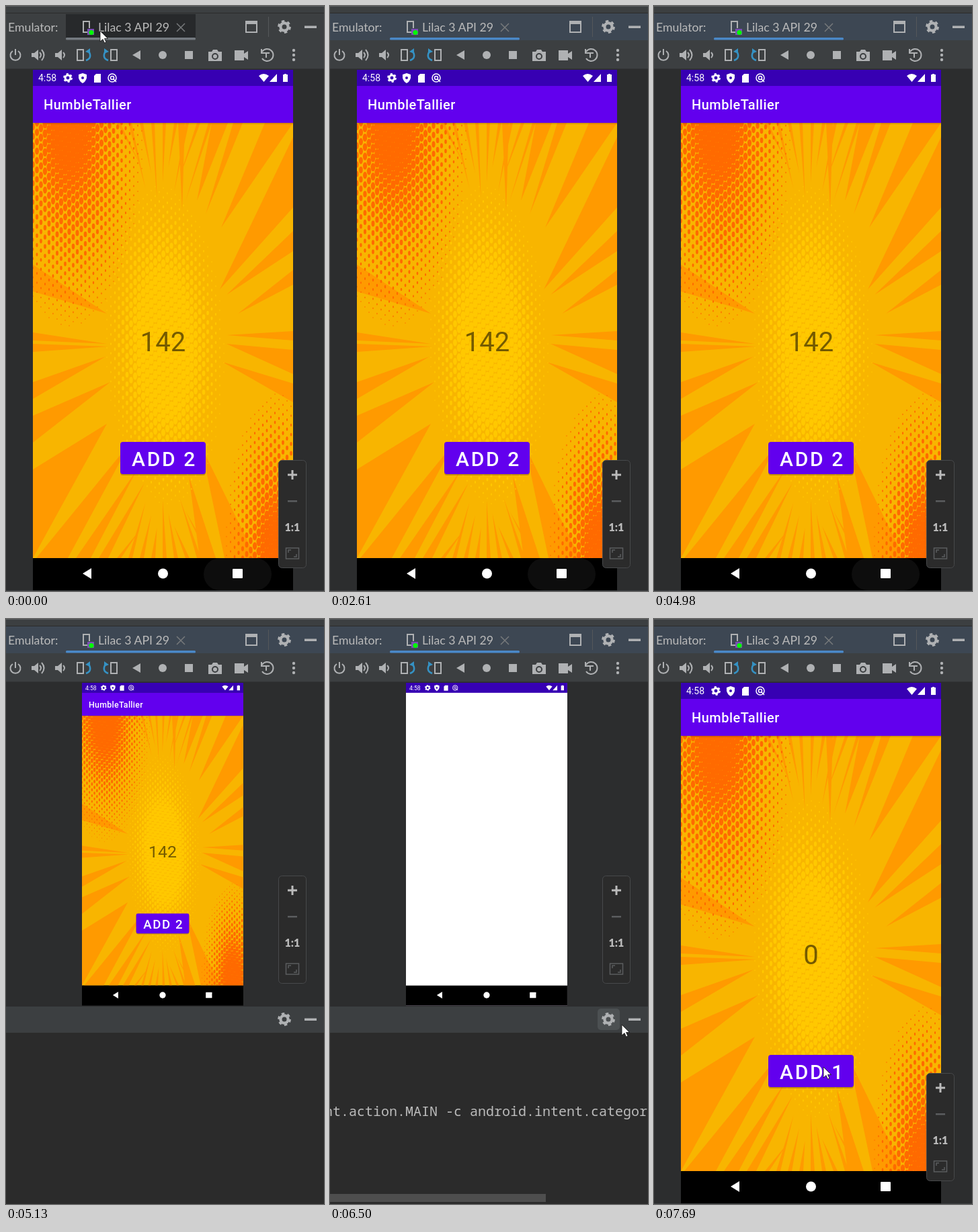
An HTML page that plays this animation: 473 by 871 pixels, repeating every 8000 ms.

```html
<!DOCTYPE html>
<html lang="en">
<head>
<meta charset="utf-8">
<style>
html, body { margin: 0; width: 100%; height: 100%; overflow: hidden; background: #2c2d2e; }
svg { display: block; }
text { white-space: pre; }
.ui { font: 17.7px Lato, sans-serif; fill: #bbb; }
.app { font-family: Roboto, sans-serif; fill: #fff; }
.line { fill: none; stroke: #afb1b3; stroke-width: 2; }
.icon { fill: #afb1b3; }
</style>
</head>
<body>
<svg id="stage" width="473" height="871" viewBox="0 0 473 871"></svg>
<script>
const rect = (x, y, w, h, fill, more = '') => `<rect x="${x}" y="${y}" width="${w}" height="${h}" fill="${fill}" ${more}/>`;
const disc = (x, y, r, fill) => `<circle cx="${x}" cy="${y}" r="${r}" fill="${fill}"/>`;
const path = (d, more = 'class="icon"') => `<path d="${d}" ${more}/>`;
const line = d => path(d, 'class="line"');
const group = (id, body, more = '') => `<g id="${id}" ${more}>${body}</g>`;

function gear(x, y, r, color = '#afb1b3') {
  const tooth = 2 * Math.PI * r * .82 / 12;
  return `<g fill="none" stroke="${color}"><circle cx="${x}" cy="${y}" r="${r * .56}" stroke-width="${r * .42}"/>
    <circle cx="${x}" cy="${y}" r="${r * .82}" stroke-width="${r * .34}" stroke-dasharray="${tooth}"/></g>`;
}

// Comic backdrop: rays and halftone dots
function rays() {
  const left = [[150, 458, 385, 425], [150, 503, 486, 498], [152, 507, 503, 515], [148, 522, 560, 585], [155, 560, 610, 650], [150, 622, 690, 822]];
  const right = [[318, 422, 195, 300], [328, 430, 335, 365], [345, 458, 393, 415], [328, 490, 484, 498], [328, 503, 512, 548], [322, 530, 562, 590]];
  const top = [[262, 305, 256, 266], [284, 290, 306, 330], [297, 310, 338, 352], [320, 330, 385, 427]];
  const bottom = [[185, 650, 45, 92], [195, 690, 104, 126], [206, 710, 138, 152], [272, 700, 288, 312], [290, 655, 325, 372]];
  let d = '';
  const across = edge => ([x, y, a, b]) => d += `M${x} ${y}L${edge} ${a}V${b}z`;
  const along = edge => ([x, y, a, b]) => d += `M${x} ${y}L${a} ${edge}H${b}z`;
  left.forEach(across(40));
  right.forEach(across(427));
  top.forEach(along(174));
  bottom.forEach(along(822));
  for (let i = 0; i < 9; i++) {
    const x = 165 + i * 17;
    along(174)([(x + 233) / 2, 235 + i * 37 % 60, x, x + 5]);
    along(822)([(x + 233) / 2, 780 - i * 41 % 60, x, x + 6]);
  }
  return path(d, 'fill="#ff9a00"');
}

function dots(x0, x1, y0, y1, fill, size) {
  let d = '';
  for (let i = 0, x = x0; x < x1; i++, x += 6)
    for (let y = y0 + i * 8 % 14; y < y1; y += 14) {
      const r = size(x, y), w = r * .55;
      if (r > .9) d += `M${(x - w).toFixed(1)} ${y}a${w} ${r} 0 1 0 ${2 * w} 0a${w} ${r} 0 1 0 ${-2 * w} 0`;
    }
  return path(d, `fill="${fill}"`);
}

const fade = (x, y, cx, cy, rx, ry) => Math.max(0, 1 - Math.hypot((x - cx) / rx, (y - cy) / ry));
const backdrop = rect(40, 174, 387, 648, '#f8b500') + rays()
  + dots(138, 330, 255, 770, '#ffc800', (x, y) => 6.6 * Math.min(1, 1.7 * fade(x, y, 236 + (y - 500) * .03, 505, 96, 260)))
  + dots(40, 220, 166, 510, '#ff6a00', (x, y) => 7.4 * Math.min(1, 1.25 * fade(x, y, 95, 174, 122, 335)))
  + dots(316, 432, 550, 830, '#ff6a00', (x, y) => 7.4 * Math.min(1, 1.25 * fade(x, y, 402, 815, 84, 265)))
  + rect(40, 174, 387, 2, '#0002');

const appScreen = `<g transform="translate(-40 -95)" clip-path="url(#art)">${backdrop}</g>`
  + rect(0, 0, 387, 24, '#3700b3') + rect(0, 24, 387, 55, '#6200ee') + rect(0, 727, 387, 48, '#000')
  + '<text class="app" x="16" y="59" font-size="20" font-weight="500" letter-spacing=".5">HumbleTallier</text>'
  + '<text class="app" id="count" x="193.5" y="419" font-size="40" text-anchor="middle" style="fill:#0000008a"></text>'
  + rect(130, 556, 127, 48, '#0003', 'rx="4"') + rect(130, 554, 127, 48, '#6200ee', 'rx="4"')
  + '<text class="app" id="add" x="147" y="590" font-size="30" font-weight="500" letter-spacing="2.67"></text>'
  + group('recent', rect(254, 727, 101, 48, '#0d0d0d', 'rx="24"'));

function homeScreen() {
  let s = rect(113, 95, 240, 481, 'url(#sky)');
  for (let i = 0; i < 8; i++) {
    const y = 250 + i * 32;
    s += path(`M113 ${y + 75}L165 ${y + 62}L200 ${y + 48}L255 ${y + 30}L300 ${y + 8}L353 ${y - 8}V576H113z`, 'fill="#8a3f8a" opacity=".11"');
  }
  return s + rect(113, 95, 240, 34, 'url(#shade)')
    + path('M113 489L150 483L182 491L214 479L250 487L285 478L318 489L353 483V576H113z', 'fill="#2a1038"')
    + '<text class="app" x="233" y="153" font-size="15" text-anchor="middle">Thursday, Jan 26</text>'
    + disc(188, 474, 15, '#1a73e8') + disc(233, 474, 15, '#fff') + disc(278, 474, 15, '#e8a23c')
    + rect(128.5, 516, 209, 27, '#8a8090', 'rx="13.5" stroke="#fff"')
    + disc(143, 529, 6.5, '#4285f4') + disc(320, 528, 6, '#4285f4');
}

const splash = rect(0, 0, 387, 775, '#fff') + rect(0, 0, 387, 24, '#3700b3') + rect(0, 727, 387, 48, '#000');

const system = '<text class="app" x="8" y="17" font-size="14">4:58</text>' + gear(52, 12, 7, '#fff')
  + path('M74 5l6 2v5q-1 5-6 8q-5-3-6-8v-5z', 'fill="#fff"') + disc(74, 12, 2, '#3700b3')
  + path('M94 6h7v13h-10v-10z', 'fill="#fff"')
  + '<g fill="none" stroke="#fff" stroke-width="1.5"><circle cx="118" cy="12" r="6"/><circle cx="118" cy="12" r="2.5"/><path d="M120 14l4 4"/></g>'
  + path('M336 9q7-6 15 0l-7.5 9zM352 18h11v-12zM372 7h2v-1h3v1h2v11h-7z', 'fill="#fff"')
  + path('M74 750l13-8v16z', 'fill="#fff"') + disc(193.5, 750, 7.5, '#fff') + rect(297, 743, 15, 14, '#fff', 'rx="1"');

const phone = group('app', appScreen)
  + group('home', homeScreen(), 'transform="scale(1.6129) translate(-113 -95)"')
  + group('splash', splash) + system;

const header = rect(0, 0, 473, 94, '#3c3f41') + rect(0, 0, 473, 1, '#5a5d5f') + rect(0, 10, 473, 1, '#2b2b2b')
  + rect(0, 11, 473, 40, '#3c3f41', 'id="bar"') + rect(89, 12, 193, 35, '#27292b', 'id="hover"')
  + rect(89, 47, 193, 3.5, '#747a80', 'id="under" rx="1.5"')
  + '<text class="ui" x="3" y="38">Emulator:</text><text class="ui" x="137" y="38">Lilac 3 API 29</text>'
  + line('M122 39h-7v-16h9v10') + rect(121, 34, 10, 9, '#7b4fb5') + disc(127, 39.5, 3.6, '#0f0')
  + path('M254 26l12 12m0-12l-12 12', 'stroke="#777a7c" stroke-width="1.5"')
  + line('M357 23h16v16h-16z') + rect(356, 22, 18, 5, '#afb1b3') + rect(390, 16, 1, 30, '#55585a')
  + gear(414, 31, 10) + rect(444, 29.5, 18, 3.5, '#afb1b3');

const speaker = x => path(`M${x} 70h4l6-5v16l-6-5h-4z`) + line(`M${x + 12} 69q4 4 0 8`);
const turn = (x, dir) => `<g transform="translate(${x} 73) scale(${dir} 1)">${line('M-10-8h9v16h-9z')}
  <path d="M3 8q9-3 5-12" fill="none" stroke="#3592c4" stroke-width="2.5"/><path d="M2-5l7-5v8z" fill="#3592c4"/></g>`;
const toolbar = line('M10 67a7.5 7.5 0 1 0 8 0M14 64v9') + speaker(38) + line('M53 65q7 8 0 16') + speaker(73)
  + turn(116, 1) + turn(155, -1) + path('M188 73l12-7v14z') + disc(233, 73, 6, '#afb1b3') + rect(266, 67, 12, 12, '#afb1b3')
  + path('M301 68h5l2-3h6l2 3h5v14h-20z') + '<circle cx="311" cy="75" r="4" fill="#afb1b3" stroke="#3c3f41" stroke-width="2"/>'
  + path('M340 66h14v5l6-4v13l-6-4v5h-14z') + line('M381 68a9 9 0 1 1 0 10M380 64v6h6M387 77v-7h5')
  + [66, 73, 80].map(y => disc(428, y, 2.2, '#afb1b3')).join('') + rect(0, 93, 473, 1, '#323435');

const zoom = rect(405.5, 676.5, 41, 160, '#2b2b2b', 'rx="5" stroke="#47494b"')
  + path('M419 698h14m-7-7v14', 'stroke="#bbb" stroke-width="3"') + rect(419, 736, 14, 2.5, '#5b5d5f')
  + '<text x="426" y="782" text-anchor="middle" font-family="Lato, sans-serif" font-size="16" font-weight="900" fill="#bbb">1:1</text>'
  + path('M416.500 807h19v16h-19zM420 814v-4h4m8 6v4h-4', 'fill="none" stroke="#5b5d5f" stroke-width="1.5"');

const panel = rect(0, 577, 473, 39, '#3c3f41') + rect(0, 616, 473, 255, '#2b2b2b')
  + rect(398, 580, 33, 32, '#4c5052', 'id="gearHover" rx="5"') + rect(436, 579, 34, 34, '#4c5052', 'id="minusHover" rx="5"')
  + gear(414, 596, 10) + rect(444, 594.5, 18, 3.5, '#afb1b3')
  + group('log', '<text x="-8" y="740" fill="#bbb" font-family="Noto Sans Mono, monospace" font-size="20">nt.action.MAIN -c android.intent.categor</text>'
    + rect(0, 856, 321, 12, '#4e4e4e'));

stage.innerHTML = `<defs>
  <clipPath id="art"><rect x="40" y="174" width="387" height="648"/></clipPath>
  <linearGradient id="sky" x2="0" y2="1"><stop stop-color="#eaa6c6"/><stop offset=".5" stop-color="#f4a5c1"/>
    <stop offset=".68" stop-color="#d77aa2"/><stop offset=".82" stop-color="#a5548a"/></linearGradient>
  <linearGradient id="shade" x2="0" y2="1"><stop stop-color="#0006"/><stop offset="1" stop-color="#0000"/></linearGradient>
</defs>` + header + toolbar + rect(0, 870, 473, 1, '#3c3f41') + group('phone', phone) + group('panel', panel) + group('zoom', zoom)
  + group('arrow', path('M0 0v16l4-3.500 2.500 5.500 2.500-1-2.500-5.500h5z', 'fill="#fff" stroke="#111" stroke-width=".8"'))
  + group('beam', path('M-4-8h3l1 1l1-1h3M0-7v14M-4 8h3l1-1l1 1h3', 'fill="none" stroke="#ddd" stroke-width="1.3"'));

const $ = id => document.getElementById(id);
const set = (id, name, value) => $(id).setAttribute(name, value);
const show = (id, on) => set(id, 'display', on ? 'inline' : 'none');
const move = (id, x, y) => set(id, 'transform', `translate(${x} ${y})`);

// Steps hold until the next time: [time, values...]
const pointer = [[0, 'arrow', 140, 37], [1480, ''], [5400, 'beam', 301, 771], [5940, 'beam', 301, 768], [6080, 'beam', 350, 700],
  [6210, 'arrow', 409, 612], [6350, 'arrow', 422, 604], [6500, 'arrow', 434, 604], [6650, 'arrow', 440, 602],
  [7320, 'arrow', 395, 622], [7440, 'arrow', 330, 646], [7570, 'arrow', 272, 664], [7690, 'arrow', 252, 667]];
const opening = [[0, 1, 0], [5520, .82, .2], [5640, .875, .5], [5790, .99, .9], [5940, 1, 1], [6650, 1, 0]];
const at = (steps, t) => steps.filter(s => s[0] <= t).pop().slice(1);

function draw(now) {
  const t = now % 8000, within = (a, b) => t >= a && t < b;
  const focused = within(2610, 3610) || t >= 4980;
  const small = within(5130, 6920), restarted = t >= 6650;

  set('bar', 'fill', focused ? '#3d4753' : '#3c3f41');
  set('under', 'fill', focused ? '#4a88c7' : '#747a80');
  show('hover', t < 1480);

  set('phone', 'transform', small ? 'translate(113 95) scale(.62)' : 'translate(40 95)');
  show('panel', small);
  move('zoom', 0, small ? -294 : 0);
  show('log', t >= 5400);
  show('gearHover', within(6350, 6650));
  show('minusHover', restarted);

  const home = within(5250, 6650);
  show('app', !home);
  show('home', home);
  show('recent', t < 5130 || within(6650, 6920));
  $('count').textContent = restarted ? '0' : '142';
  $('add').textContent = restarted ? 'ADD 1' : 'ADD 2';

  const [scale, alpha] = at(opening, t);
  set('splash', 'opacity', alpha);
  set('splash', 'transform', `translate(193.5 387.5) scale(${scale}) translate(-193.5 -387.5)`);

  const [kind, x, y] = at(pointer, t);
  for (const id of ['arrow', 'beam']) show(id, id === kind);
  if (kind) move(kind, x, y);
  requestAnimationFrame(draw);
}
draw(0);
</script>
</body>
</html>
```
